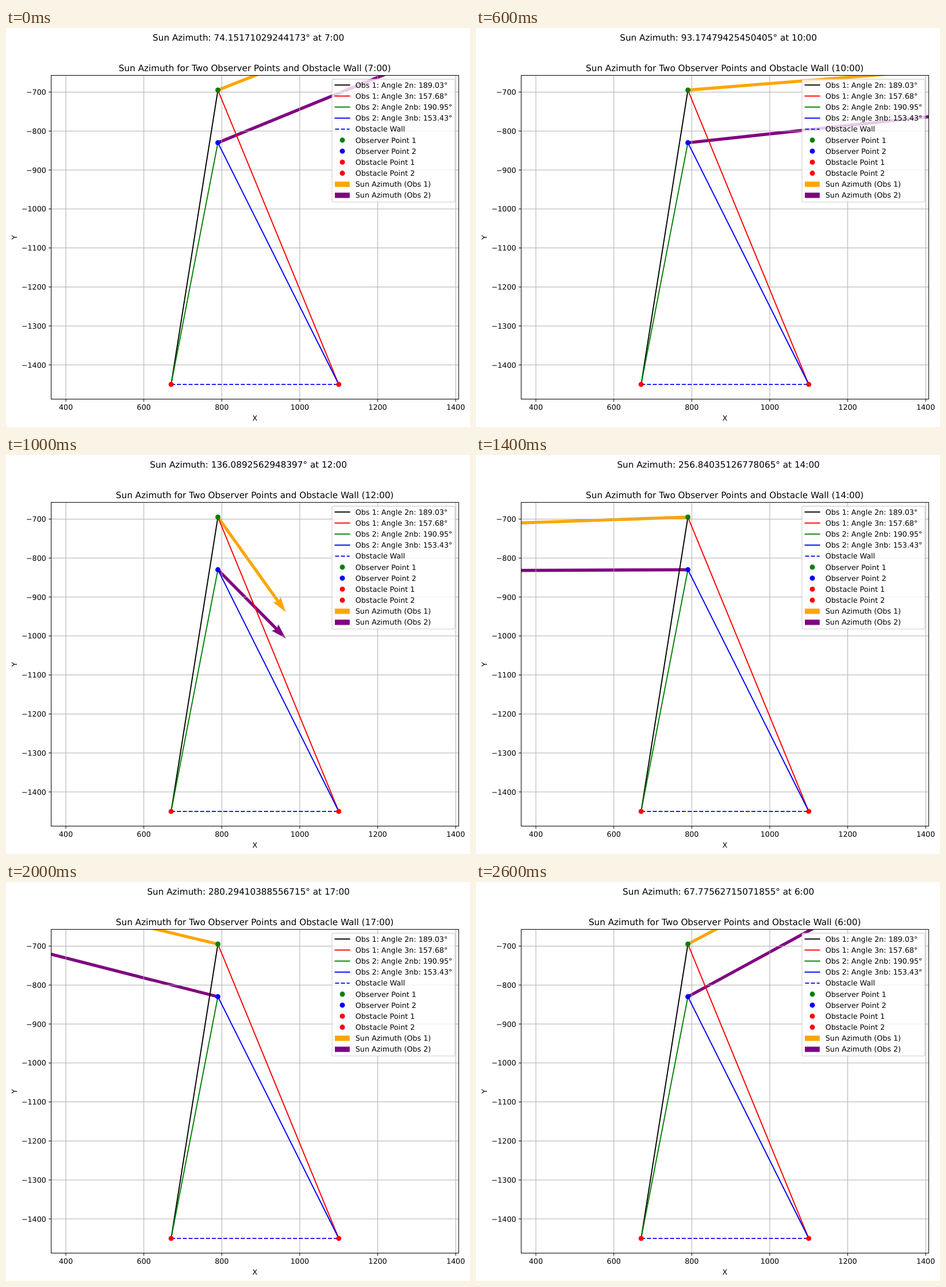
These frames come from a looping animation (807 px wide and 694 px high, 2800 ms). An HTML page:

```html
<!DOCTYPE html>
<html lang="en">
<head>
<meta charset="utf-8">
<title>Sun azimuth</title>
<style>
  html, body { margin: 0; width: 100%; height: 100%; overflow: hidden; background: #fff; }
  svg { display: block; width: 807px; height: 694px; font: 12.69px "DejaVu Sans", sans-serif; text-rendering: geometricPrecision; }
  .title { font-size: 15.23px; text-anchor: middle; }
  .mid { text-anchor: middle; }
  .end { text-anchor: end; }
  .grid { stroke: #b0b0b0; stroke-width: 1.02; }
  .axis { stroke: #000; stroke-width: 1.02; fill: none; }
  .line { stroke-width: 1.9; stroke-linecap: square; }
  .dash { stroke-width: 1.9; stroke-dasharray: 7.05 3.05; }
</style>
</head>
<body>
<svg id="stage" viewBox="0 0 807 694"></svg>
<script>
const STEP = 200;
const BOX = { l: 78.6, r: 787.3, t: 82.4, b: 645.5 };
const SCALE = 0.678;
const px = x => 432.95 + (x - 885) * SCALE;
const py = y => 363.95 - (y + 1072.5) * SCALE;

// [hour, azimuth in degrees as printed]
const hours = [
  [7, '74.15171029244173'], [8, '80.08264719350482'], [9, '86.0855428424999'],
  [10, '93.17479425450405'], [11, '104.21738520946317'], [12, '136.0892562948397'],
  [13, '228.28461937205148'], [14, '256.84035126778065'], [15, '267.39172846035921'],
  [16, '274.35286410973546'], [17, '280.29410388556715'], [18, '286.27351904628173'],
  [19, '292.70846135927504'], [6, '67.77562715071855']
];

const obs1 = [790, -695], obs2 = [790, -830];
const wall1 = [670, -1450], wall2 = [1100, -1450];

const seg = (x1, y1, x2, y2, cls, color) =>
  `<line x1="${x1}" y1="${y1}" x2="${x2}" y2="${y2}" class="${cls}"${color ? ` stroke="${color}"` : ''}/>`;
const label = (x, y, str, cls = '') => `<text x="${x}" y="${y}" class="${cls}">${str}</text>`;
const dot = (x, y, color) => `<circle cx="${x}" cy="${y}" r="4.45" fill="${color}"/>`;
const join = (a, b, cls, color) => seg(px(a[0]), py(a[1]), px(b[0]), py(b[1]), cls, color);
const mark = (p, color) => dot(px(p[0]), py(p[1]), color);

let grid = '', ticks = '';
for (let v = 400; v <= 1400; v += 200) {
  const x = px(v);
  grid += seg(x, BOX.t, x, BOX.b, 'grid');
  ticks += seg(x, BOX.b, x, BOX.b + 4.4, 'axis') + label(x, 664.4, v, 'mid');
}
for (let v = 700; v <= 1400; v += 100) {
  const y = py(-v);
  grid += seg(BOX.l, y, BOX.r, y, 'grid');
  ticks += seg(BOX.l - 4.4, y, BOX.l, y, 'axis') + label(69.8, y + 4.6, '\u2212' + v, 'end');
}

const legend = [
  ['line', 'black', 'Obs 1: Angle 2n: 189.03°'],
  ['line', 'red', 'Obs 1: Angle 3n: 157.68°'],
  ['line', 'green', 'Obs 2: Angle 2nb: 190.95°'],
  ['line', 'blue', 'Obs 2: Angle 3nb: 153.43°'],
  ['dash', 'blue', 'Obstacle Wall'],
  ['dot', 'green', 'Observer Point 1'],
  ['dot', 'blue', 'Observer Point 2'],
  ['dot', 'red', 'Obstacle Point 1'],
  ['dot', 'red', 'Obstacle Point 2'],
  ['patch', 'orange', 'Sun Azimuth (Obs 1)'],
  ['patch', 'purple', 'Sun Azimuth (Obs 2)']
].map(([kind, color, str], i) => {
  const y = 99.2 + i * 19.17;
  const key = kind === 'dot' ? dot(585, y, color)
    : kind === 'patch' ? `<rect x="572" y="${y - 4.5}" width="25.8" height="9.2" fill="${color}"/>`
    : seg(572.4, y, 597.6, y, kind, color);
  return key + label(607.8, y + 4.5, str);
}).join('');

const stage = document.getElementById('stage');
stage.innerHTML = `
  <clipPath id="plot"><rect x="${BOX.l}" y="${BOX.t}" width="${BOX.r - BOX.l}" height="${BOX.b - BOX.t}"/></clipPath>
  <g clip-path="url(#plot)">
    <polygon id="sun1" fill="orange"/>
    <polygon id="sun2" fill="purple"/>
    ${grid}
    ${join(obs1, wall1, 'line', 'black')}
    ${join(obs1, wall2, 'line', 'red')}
    ${join(obs2, wall1, 'line', 'green')}
    ${join(obs2, wall2, 'line', 'blue')}
    ${join(wall1, wall2, 'dash', 'blue')}
    ${mark(obs1, 'green')}${mark(obs2, 'blue')}${mark(wall1, 'red')}${mark(wall2, 'red')}
  </g>
  ${ticks}
  <rect x="${BOX.l}" y="${BOX.t}" width="${BOX.r - BOX.l}" height="${BOX.b - BOX.t}" class="axis"/>
  <rect x="567" y="89" width="213.8" height="213.6" rx="2.5" fill="#fff" stroke="#ccc" stroke-width="1.27" opacity=".8"/>
  ${legend}
  ${label(432.9, 682.6, 'X', 'mid')}
  <text transform="translate(18.5 364) rotate(-90)" class="mid">Y</text>
  <text id="head" x="421.6" y="22.3" class="title"></text>
  <text id="sub" x="432.7" y="75" class="title"></text>`;

const [sun1, sun2, head, sub] = ['sun1', 'sun2', 'head', 'sub'].map(id => document.getElementById(id));

// Arrow outline: shaft width w, barbed head 5w long and 3w wide
function arrow(from, sun) {
  const w = 5.31;
  const dx = (sun[0] - from[0]) / 2 * SCALE, dy = (from[1] - sun[1]) / 2 * SCALE;
  const len = Math.hypot(dx, dy), c = dx / len, s = dy / len;
  const neck = len - 4.5 * w, barb = len - 5 * w;
  return [[0, -.5], [neck, -.5], [barb, -1.5], [len, 0], [barb, 1.5], [neck, .5], [0, .5]]
    .map(([a, b]) => [px(from[0]) + a * c - b * w * s, py(from[1]) + a * s + b * w * c].join())
    .join(' ');
}

// Ground position of the sun on a sphere of radius 10000
function sunAt(hour, azimuth) {
  const rad = Math.PI / 180;
  const x = -9300 * Math.sin((15 * (hour - 12) - 7.03) * rad);
  return [x, x / Math.tan(azimuth * rad)];
}

let shown = -1;
function draw(now) {
  const i = Math.floor(now / STEP) % hours.length;
  if (i !== shown) {
    shown = i;
    const [hour, azimuth] = hours[i], sun = sunAt(hour, +azimuth);
    sun1.setAttribute('points', arrow(obs1, sun));
    sun2.setAttribute('points', arrow(obs2, sun));
    head.textContent = `Sun Azimuth: ${azimuth}° at ${hour}:00`;
    sub.textContent = `Sun Azimuth for Two Observer Points and Obstacle Wall (${hour}:00)`;
  }
}

const start = performance.now();
function tick() {
  draw(performance.now() - start);
  requestAnimationFrame(tick);
}
tick();
</script>
</body>
</html>
```
